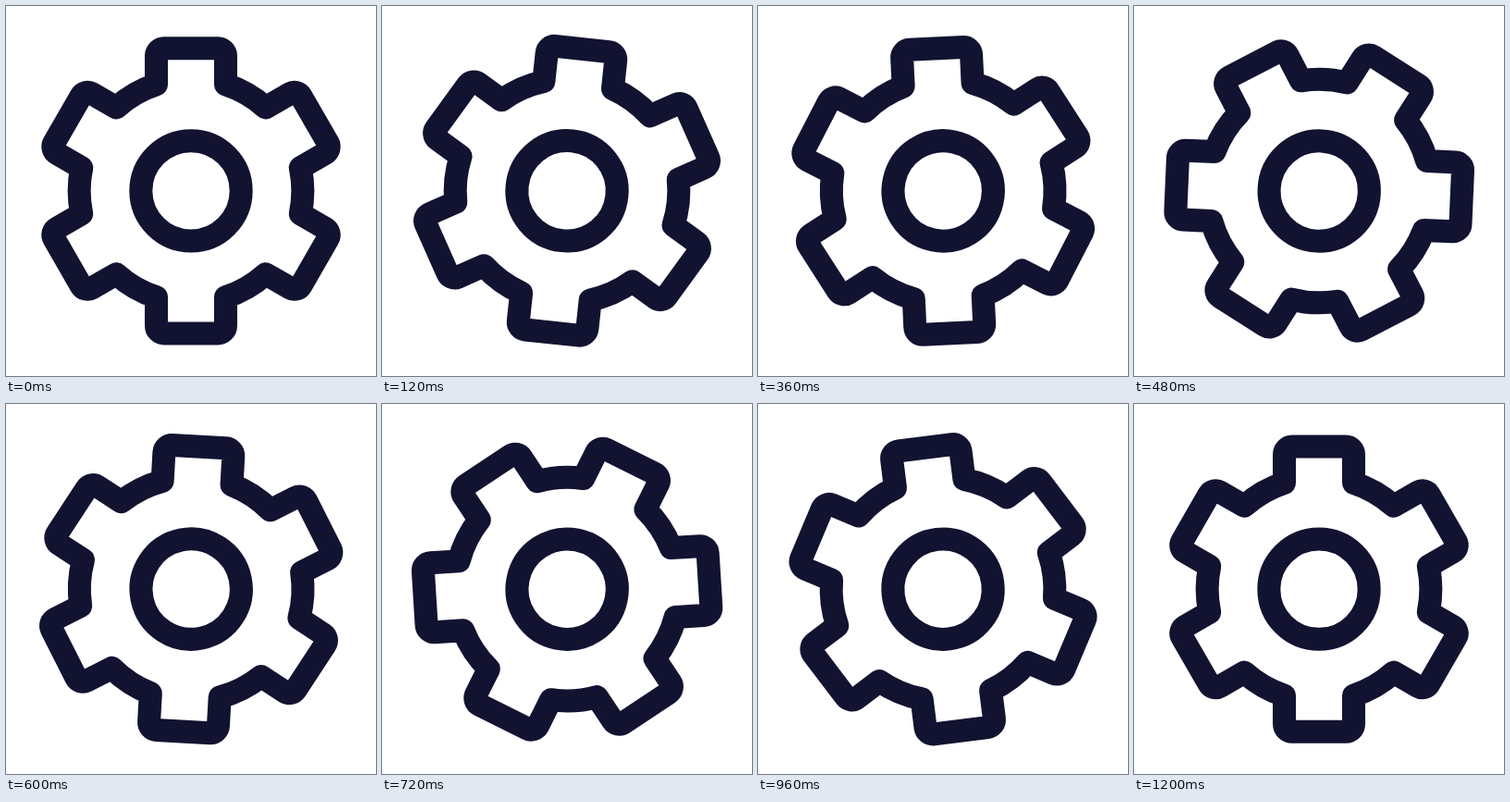
An HTML page with a canvas for the animation above (1.23 s loop, 400 by 400 pixels).

```html
<!DOCTYPE html>
<html lang="en">
<head>
<meta charset="utf-8">
<title>Turning gear</title>
<style>
  html, body { margin: 0; width: 100%; height: 100%; overflow: hidden; background: #fff; }
  canvas { display: block; }
</style>
</head>
<body>
<canvas width="400" height="400"></canvas>
<script>
const ctx = document.querySelector('canvas').getContext('2d');
const LOOP = 1230, TURN = 1200;
const UNIT = 400 / 48;

// Gear measures on a 48-unit grid
const HUB = 6.5, BODY = 14.5, TIP = 18.5, HALF = 4.5, CORNER = 1;
const rootAngle = Math.asin(HALF / BODY);
const rootY = -BODY * Math.cos(rootAngle);

// Cubic bezier (0.333, 0, 0.383, 1), solved for x by bisection
function ease(x) {
  let lo = 0, hi = 1, s = 0.5;
  for (let i = 0; i < 30; i++) {
    s = (lo + hi) / 2;
    const at = 3 * 0.333 * s * (1 - s) ** 2 + 3 * 0.383 * s * s * (1 - s) + s ** 3;
    if (at < x) lo = s; else hi = s;
  }
  return s * s * (3 - 2 * s);
}

function traceGear() {
  const up = -Math.PI / 2, step = Math.PI / 3;
  for (let i = 0; i < 6; i++) {
    ctx.arc(0, 0, BODY, up - step + rootAngle, up - rootAngle);
    ctx.arcTo(-HALF, -TIP, HALF, -TIP, CORNER);
    ctx.arcTo(HALF, -TIP, HALF, rootY, CORNER);
    ctx.lineTo(HALF, rootY);
    ctx.rotate(step);
  }
  ctx.closePath();
}

function draw(now) {
  const progress = Math.min(now % LOOP / TURN, 1);
  ctx.setTransform(1, 0, 0, 1, 0, 0);
  ctx.fillStyle = '#fff';
  ctx.fillRect(0, 0, 400, 400);

  ctx.translate(200, 200);
  ctx.rotate(Math.PI * ease(progress));
  ctx.translate(0, -0.2);
  ctx.scale(UNIT, UNIT);
  ctx.strokeStyle = '#121331';
  ctx.lineWidth = 3;
  ctx.lineJoin = 'round';

  ctx.beginPath();
  traceGear();
  ctx.moveTo(HUB, 0);
  ctx.arc(0, 0, HUB, 0, 2 * Math.PI);
  ctx.stroke();
}

const start = performance.now();
function tick() {
  draw(performance.now() - start);
  requestAnimationFrame(tick);
}
tick();
</script>
</body>
</html>
```
